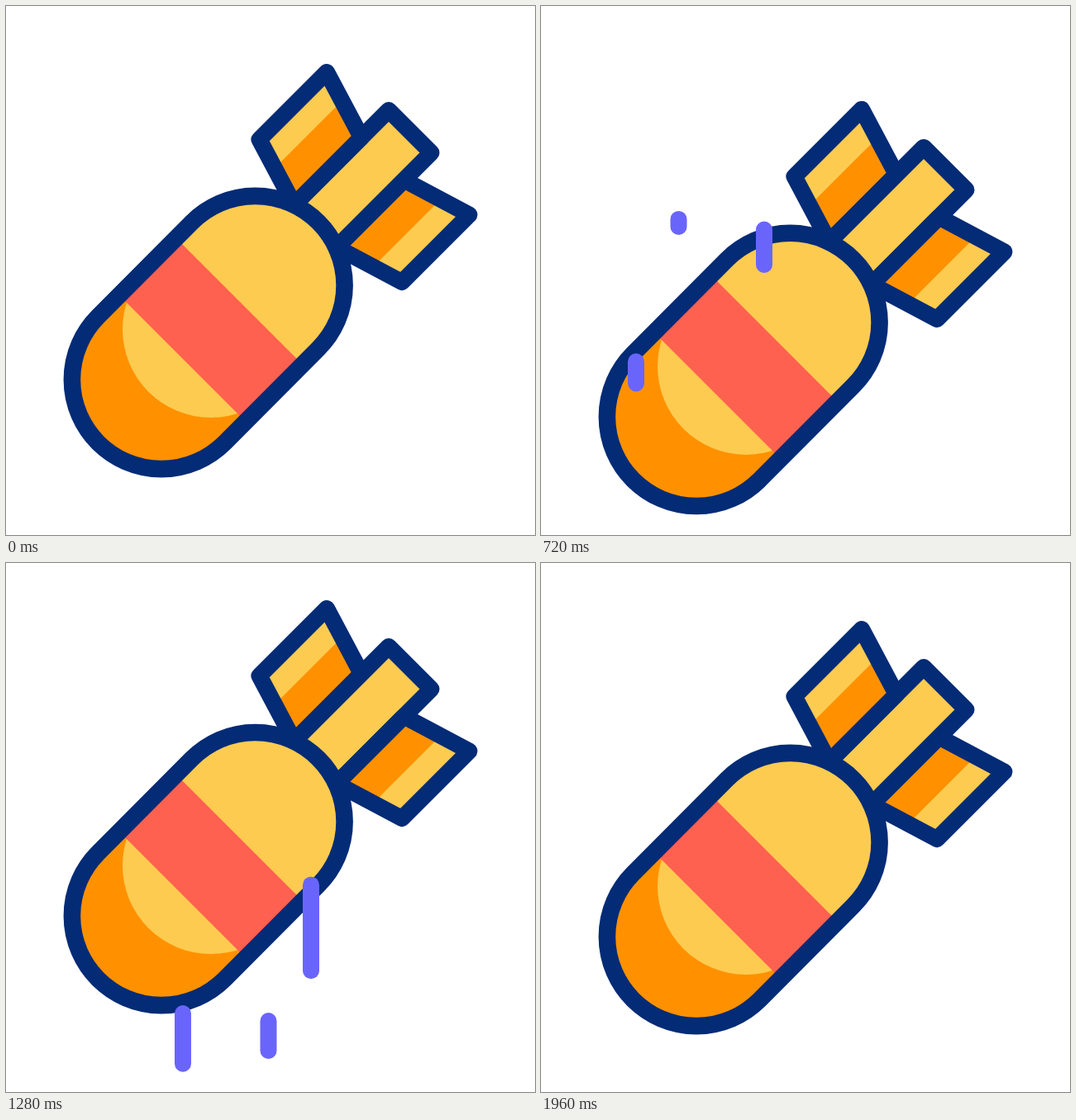
Write an HTML page with a canvas that moves like this. It is 640 px wide and 640 px high and loops after 2000 ms.

```html
<!DOCTYPE html>
<html lang="en">
<head>
<meta charset="utf-8">
<title>Falling bomb</title>
<style>
html, body { margin: 0; width: 100%; height: 100%; overflow: hidden; background: #fff; }
canvas { display: block; width: 100vmin; height: 100vmin; }
</style>
</head>
<body>
<canvas id="stage" width="640" height="640"></canvas>
<script>
const ctx = document.getElementById('stage').getContext('2d');
const LOOP = 2000, STEP = 40;
const NAVY = '#032b76', YELLOW = '#fdcb50', ORANGE = '#ff9100', RED = '#ff6150', PURPLE = '#6a65fa';

const ramp = (t, a, b) => Math.min(1, Math.max(0, (t - a) / (b - a)));
const ease = (t, a, b) => { const p = ramp(t, a, b); return p * p * (3 - 2 * p); };
const mix = (a, b, k) => a + (b - a) * k;

// Bomb coordinates: c runs across the axis, d along it towards the tail.
const AXIS = 640.5;
const at = (c, d) => [(AXIS + c + d) / 2, (AXIS + c - d) / 2];

function trace(points) {
  ctx.beginPath();
  points.forEach(([x, y]) => ctx.lineTo(x, y));
  ctx.closePath();
}

function shape(points, fill) {
  trace(points);
  ctx.fillStyle = fill;
  ctx.fill();
}

function outline(width = 20) {
  ctx.lineWidth = width;
  ctx.strokeStyle = NAVY;
  ctx.stroke();
}

function line(x1, y1, x2, y2) {
  ctx.lineWidth = 20;
  ctx.strokeStyle = PURPLE;
  ctx.beginPath();
  ctx.moveTo(x1, y1);
  ctx.lineTo(x2, y2);
  ctx.stroke();
}

// s is the sideways reach from -1 to 1; root and lift slide the inner and outer edge.
function fin(s, root, lift, fade) {
  const fold = 1 - Math.abs(s);
  const base = 51.5 * s, tip = 172.5 * s;
  const g = Math.max(0, 0.56 - fade * fold);
  const quad = k => {
    const c = mix(base, tip, k), slide = mix(root, 37 + lift, k);
    return [at(base, 108 + root), at(base, 271 + root), at(c, 271 + slide), at(c, 108 + slide)];
  };
  shape(quad(1), YELLOW);
  shape(quad(g), ORANGE);
  trace(quad(1));
  outline();
}

function farFin(s) {
  fin(s, 0, -75 * (1 - Math.abs(s)), 0.55);
}

function nearFin(s) {
  const fold = 1 - Math.abs(s);
  const slide = 40 * fold * (1 - fold / 2);
  fin(s, slide, slide, 0.78);
}

function turn(t) {
  const back = t >= 1400;
  const p = back ? ramp(t, 1400, 1960) : ramp(t, 120, 680);
  const near = p + 0.18 * p * (1 - p);
  const sway = p > 0.5 ? 0.036 : back ? 0.12 : 0.07;
  const far = p + sway * Math.sin(2 * Math.PI * p);
  const dir = back ? 1 : -1;
  return [dir * Math.cos(Math.PI * near), -dir * Math.cos(Math.PI * far)];
}

function capsule() {
  ctx.beginPath();
  ctx.arc(188, 452, 108.1, Math.PI / 4, Math.PI * 5 / 4);
  ctx.arc(301.5, 338, 108.1, Math.PI * 5 / 4, Math.PI / 4);
  ctx.closePath();
}

function bandLines(t) {
  const back = t >= 1400;
  const lead = back ? ease(t, 1400, 1680) : ease(t, 120, 400);
  const trail = back ? ease(t, 1520, 1920) : ease(t, 240, 640);
  if (lead - trail < 0.001) return;
  const pos = k => 206 + 152.5 * (back ? 1 - k : k);
  const a = pos(trail), b = pos(lead);
  line(a, a + 75, b, b + 75);
  line(a - 69, a + 144, b - 69, b + 144);
}

function body(t) {
  ctx.save();
  capsule();
  ctx.clip();
  ctx.fillStyle = ORANGE;
  ctx.fillRect(0, 0, 640, 640);
  ctx.fillStyle = YELLOW;
  ctx.beginPath();
  ctx.arc(248, 391, 107, 0, 7);
  ctx.fill();
  shape([[113, 188], [413, 488], [640, 488], [640, 100], [113, 100]], YELLOW);
  shape([[113, 188], [413, 488], [344, 557], [44, 257]], RED);
  bandLines(t);
  ctx.restore();
  capsule();
  outline(20.6);
}

function streak(t, x, y, len, delay) {
  const head = ease(t, 120 + delay, 640 + delay);
  const tail = ease(t, 360 + delay, 840 + delay);
  if (head - tail > 0.001) line(x, y + len * tail, x, y + len * head);
}

function streaks(t) {
  streak(t, 115, 288.5, 168, 0);
  streak(t, 166.5, 209, 58, 0);
  streak(t, 270, 200, 113, 80);
}

function draw(t) {
  ctx.fillStyle = '#fff';
  ctx.fillRect(0, 0, 640, 640);
  ctx.lineCap = ctx.lineJoin = 'round';

  const dy = 48.5 * ease(t, 120, 840) - 83.3 * ease(t, 840, 1400) + 34.8 * ease(t, 1400, 1960);
  const [near, far] = turn(t);
  ctx.save();
  ctx.translate(0, dy);
  farFin(far);
  shape([at(-51.5, 60), at(-51.5, 337), at(51.5, 337), at(51.5, 60)], YELLOW);
  outline();
  nearFin(near);
  body(t);
  ctx.restore();

  streaks(t);
  // The rising streaks are the falling ones turned half round.
  ctx.save();
  ctx.translate(484, 808);
  ctx.rotate(Math.PI);
  streaks(t - 800);
  ctx.restore();
}

const start = performance.now();
function tick() {
  const t = (performance.now() - start) % LOOP;
  draw(Math.floor(t / STEP) * STEP);
  requestAnimationFrame(tick);
}
tick();
</script>
</body>
</html>
```
